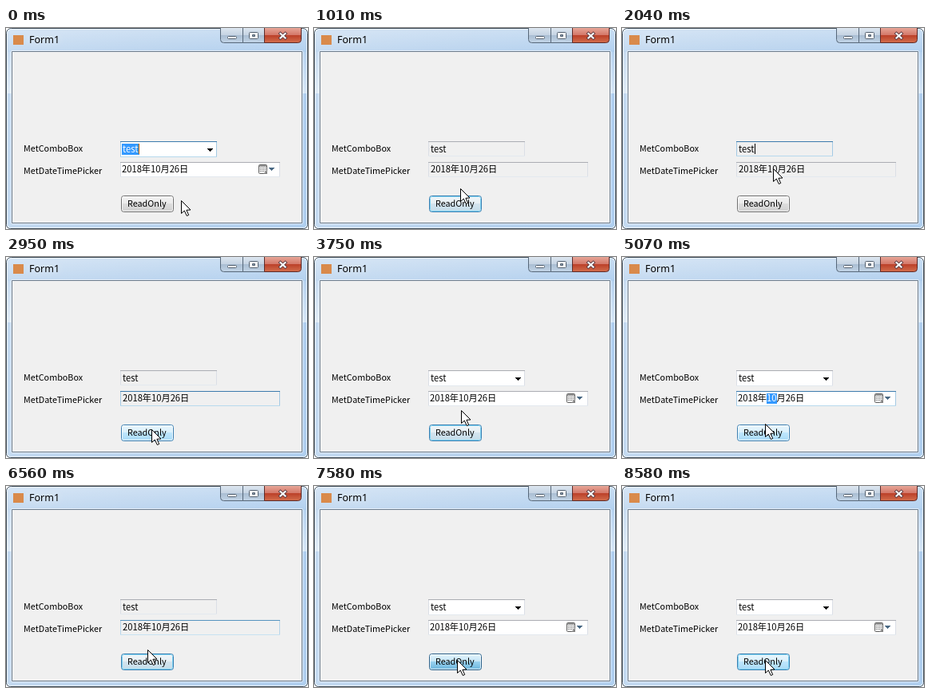
An HTML page with a canvas for the animation above (8730 ms loop, 378 by 252 pixels).

```html
<!DOCTYPE html>
<html lang="ja">
<head>
<meta charset="utf-8">
<title>Form1</title>
<style>
html, body { margin: 0; width: 100%; height: 100%; overflow: hidden; background: #fff; }
canvas { display: block; width: 378px; height: 252px; }
</style>
</head>
<body>
<canvas id="stage" width="378" height="252"></canvas>
<script>
const ctx = document.getElementById('stage').getContext('2d');
const LOOP = 8730;
const STEP = 70;   // pointer refresh interval
const BLINK = 530; // caret half period
const LAG = 100;   // border highlight delay
const UI = '"Noto Sans CJK JP", "Noto Sans CJK", sans-serif';

const box = (x, y, w, h) => ({ x, y, w, h });
const controls = {
  combo: box(143, 142, 121, 20),
  date: box(143, 168, 200, 19),
  button: box(144, 210, 66, 21)
};

const moves = [];
const clicks = [{ t: 0, on: 'combo' }];

const inside = (p, b) => p.x >= b.x && p.x < b.x + b.w && p.y >= b.y - 1 && p.y < b.y + b.h;

function pointerAt(t) {
  let p = { x: 219, y: 216 };
  for (const m of moves) {
    if (t < m.t) break;
    const k = Math.min(1, (Math.floor((t - m.t) / STEP) + 1) / m.steps);
    const e = 1 - (1 - k) ** 2.2;
    p = { x: p.x + (m.x - p.x) * e, y: p.y + (m.y - p.y) * e };
  }
  return { x: Math.round(p.x), y: Math.round(p.y) };
}

const go = (t, steps, x, y) => moves.push({ t, steps, x, y });

// A click focuses whatever lies under the pointer
function click(t, hold = 75) {
  const p = pointerAt(t);
  const on = Object.keys(controls).find(name => inside(p, controls[name]));
  clicks.push({ t, on, end: t + hold });
}

go(220, 4, 182, 218);
click(470, 220);
go(1010, 8, 187, 150);
click(1720);
go(1900, 6, 189, 183);
click(2200);
go(2650, 6, 182, 217);
click(3430);
go(3660, 9, 187, 157);
click(4300);
go(4370, 4, 184, 177);
click(4680);
go(4930, 6, 177, 218);
click(5320, 150);
go(5690, 4, 182, 218);
go(6170, 4, 175, 186);
go(6560, 3, 179, 218);
click(6790);
click(7580);
click(8500);

// Top, side and bottom line of a field
const EDGES = {
  normal: ['#abadb3', '#dbdfe6', '#e3e9ef'],
  hot: ['#5794bf', '#b7d5ea', '#c7e2f1'],
  focus: ['#3d7bad', '#a4c9e3', '#b7d9ed']
};
// Outline, then the glossy face from top to bottom
const FACES = {
  normal: ['#707070', '#f2f2f2', '#ebebeb', '#dddddd', '#cfcfcf'],
  focus: ['#3c7fb1', '#f0f5f8', '#e6eff4', '#d4e4ee', '#c2dcea'],
  hot: ['#3c7fb1', '#eaf6fd', '#d9f0fc', '#bee6fd', '#a7d9f5'],
  down: ['#2c628b', '#e5f4fc', '#c4e5f6', '#98d1ef', '#68b3db']
};

function rect(x, y, w, h, color) {
  ctx.fillStyle = color;
  ctx.fillRect(x, y, w, h);
}

function shade(x0, y0, x1, y1, ...colors) {
  const g = ctx.createLinearGradient(x0, y0, x1, y1);
  colors.forEach((c, i) => g.addColorStop(i / (colors.length - 1), c));
  return g;
}

function paint(fill, stroke) {
  if (fill) { ctx.fillStyle = fill; ctx.fill(); }
  if (stroke) { ctx.strokeStyle = stroke; ctx.lineWidth = 1; ctx.stroke(); }
}

function round(x, y, w, h, r, fill, stroke) {
  ctx.beginPath();
  ctx.roundRect(x, y, w, h, r);
  paint(fill, stroke);
}

function shape(points, fill, stroke) {
  ctx.beginPath();
  points.forEach(([x, y]) => ctx.lineTo(x, y));
  ctx.closePath();
  paint(fill, stroke);
}

function dropArrow(x, y, color) {
  for (let i = 0; i < 4; i++) rect(x + i, y + i, 7 - 2 * i, 1, color);
}

function text(str, x, y, size, color = '#000', family = UI) {
  ctx.font = `${size}px ${family}`;
  ctx.fillStyle = color;
  ctx.fillText(str, x, y);
  return ctx.measureText(str).width;
}

function glass(x, y, w, h, r, [a, b, c, d], stroke) {
  const g = ctx.createLinearGradient(0, y, 0, y + h);
  [[0, a], [.48, b], [.5, c], [1, d]].forEach(s => g.addColorStop(...s));
  round(x + .5, y + .5, w - 1, h - 1, r, g, stroke);
}

function drawCaption() {
  const tint = ['#dfe8f1', '#c6d4e3', '#a9bdd2', '#c3d5e7'];
  glass(268, -1, 29, 20, [0, 0, 0, 4], tint, '#566779');
  glass(296, -1, 28, 20, 0, tint, '#566779');
  glass(323, -1, 47, 20, [0, 0, 4, 0], ['#e9aa9c', '#d4796a', '#bb3f28', '#d4704e'], '#5c2a28');

  round(277.5, 10.5, 11, 3, 1, '#fff', '#53606f');
  round(304.5, 5.5, 11, 8, 1, '#fff', '#53606f');
  round(308.5, 8.5, 3, 2, 0, '#8c9fb3', '#53606f');

  ctx.lineCap = 'square';
  for (const [color, width] of [['#5b3a40', 4], ['#fff', 2.2]]) {
    ctx.strokeStyle = color;
    ctx.lineWidth = width;
    ctx.beginPath();
    for (const side of [-1, 1]) {
      ctx.moveTo(346.5 - 3 * side, 7);
      ctx.lineTo(346.5 + 3 * side, 12.5);
    }
    ctx.stroke();
  }
  ctx.lineCap = 'butt';
}

function drawWindow() {
  rect(0, 0, 378, 252, '#fff');
  round(.5, .5, 377, 251, [6, 6, 5, 5], shade(0, 0, 378, 0, '#c4daf1', '#b9d3ee', '#b0cfef'), '#3a4957');
  round(1.5, 1.5, 375, 249, [5, 5, 4, 4], null, 'rgba(255,255,255,.75)');
  for (const x of [2, 371]) rect(x, 30, 5, 52, shade(0, 30, 0, 82, 'rgba(255,255,255,.1)', 'rgba(255,255,255,.5)'));
  rect(2, 2, 374, 26, shade(0, 2, 0, 28, 'rgba(255,255,255,.3)', 'rgba(255,255,255,.05)'));
  drawCaption();

  round(6.5, 28.5, 365, 217, 1, null, 'rgba(255,255,255,.6)');
  round(7.5, 29.5, 363, 215, 0, '#f0f0f0', '#6b7b8c');

  rect(9, 9, 13, 12, '#d98a4b');
  ctx.shadowColor = '#fff';
  ctx.shadowBlur = 10;
  text('Form1', 29, 19, 12.5, '#000', '"Noto Sans", sans-serif');
  ctx.shadowBlur = 0;

  text('MetComboBox', 22, 155, 10.8);
  text('MetDateTimePicker', 22, 183, 10.8);
}

function drawField({ x, y, w, h }, look, locked) {
  const [top, side, bottom] = EDGES[look];
  rect(x, y, w, h, side);
  rect(x, y, w, 1, top);
  rect(x, y + h - 1, w, 1, bottom);
  rect(x + 1, y + 1, w - 2, h - 2, locked ? '#f0f0f0' : '#fff');
}

function drawCombo({ focus, locked, caret, pos }) {
  const area = controls.combo;
  const focused = focus === 'combo';
  const selected = focused && !locked;
  // The read-only box is one pixel shorter
  drawField({ ...area, h: area.h - locked }, focused ? 'focus' : inside(pos, area) ? 'hot' : 'normal', locked);
  if (selected) rect(145, 145, 22, 14, '#3399ff');
  text('test', 146, 156, 11.2, selected ? '#fff' : '#000');
  if (focused && caret) rect(166, 145, 1, 13, selected ? '#cc6600' : '#000');
  if (!locked) dropArrow(252, 151, '#000');
}

function drawDate({ focus, locked, caret, trail }) {
  const area = controls.date;
  const focused = focus === 'date';
  drawField(area, focused ? 'focus' : inside(trail, area) ? 'hot' : 'normal', locked);
  let x = locked ? 146 : 145;
  for (const part of ['2018年', '10', '月26日']) {
    const picked = focused && !locked && part === '10';
    if (picked) rect(181, 171, 13, 13, '#3399ff');
    x += text(part, x, 181, 11.2, picked ? '#fff' : '#000');
  }
  if (focused && locked && caret) rect(188, 171, 1, 12, '#000');
  if (locked) return;

  round(316.5, 171.5, 10, 11, 1, '#f4f4f4', '#5f5f5f');
  rect(317, 172, 9, 2, '#9a9a9a');
  for (let i = 0; i < 12; i++) rect(318 + i % 4 * 2, 175 + Math.floor(i / 4) * 2, 1, 1, '#666');
  shape([[322, 183], [327, 178], [327, 183]], '#858585');
  dropArrow(329, 175, '#4a6984');
}

function drawButton({ focus, down, pos }) {
  const { x, y, w, h } = controls.button;
  const focused = focus === 'button';
  const look = down ? 'down' : inside(pos, controls.button) ? 'hot' : focused ? 'focus' : 'normal';
  const [edge, ...face] = FACES[look];
  glass(x, y, w, h, 3, face, edge);
  round(x + 1.5, y + 1.5, w - 3, h - 3, 2, null, focused && !down ? '#7fd3f2' : 'rgba(255,255,255,.75)');
  text('ReadOnly', 152, 224, 10.8);
}

function drawPointer({ x, y }) {
  if (inside({ x, y }, controls.combo)) {
    rect(x, y - 6, 1, 13, '#000');
    for (const dy of [-7, 7]) {
      rect(x - 3, y + dy, 3, 1, '#000');
      rect(x + 1, y + dy, 3, 1, '#000');
    }
    return;
  }
  const arrow = [[0, 0], [0, 16], [3.8, 12.6], [6.8, 19], [9.2, 18], [6.4, 11.8], [11.5, 11.5]];
  shape(arrow.map(([dx, dy]) => [x + dx + .5, y + dy + .5]), '#fff', '#000');
}

function draw(t) {
  const past = clicks.filter(c => t >= c.t);
  const last = past[past.length - 1];
  const state = {
    pos: pointerAt(t),
    trail: pointerAt(t - LAG),
    focus: last.on,
    down: last.on === 'button' && t < last.end,
    locked: past.filter(c => c.on === 'button' && t >= c.end).length % 2 === 1,
    caret: Math.floor((t - last.t) / BLINK) % 2 === 0
  };
  drawWindow();
  drawCombo(state);
  drawDate(state);
  drawButton(state);
  drawPointer(state.pos);
}

const begin = performance.now();
function tick() {
  draw((performance.now() - begin) % LOOP);
  requestAnimationFrame(tick);
}
tick();
</script>
</body>
</html>
```
